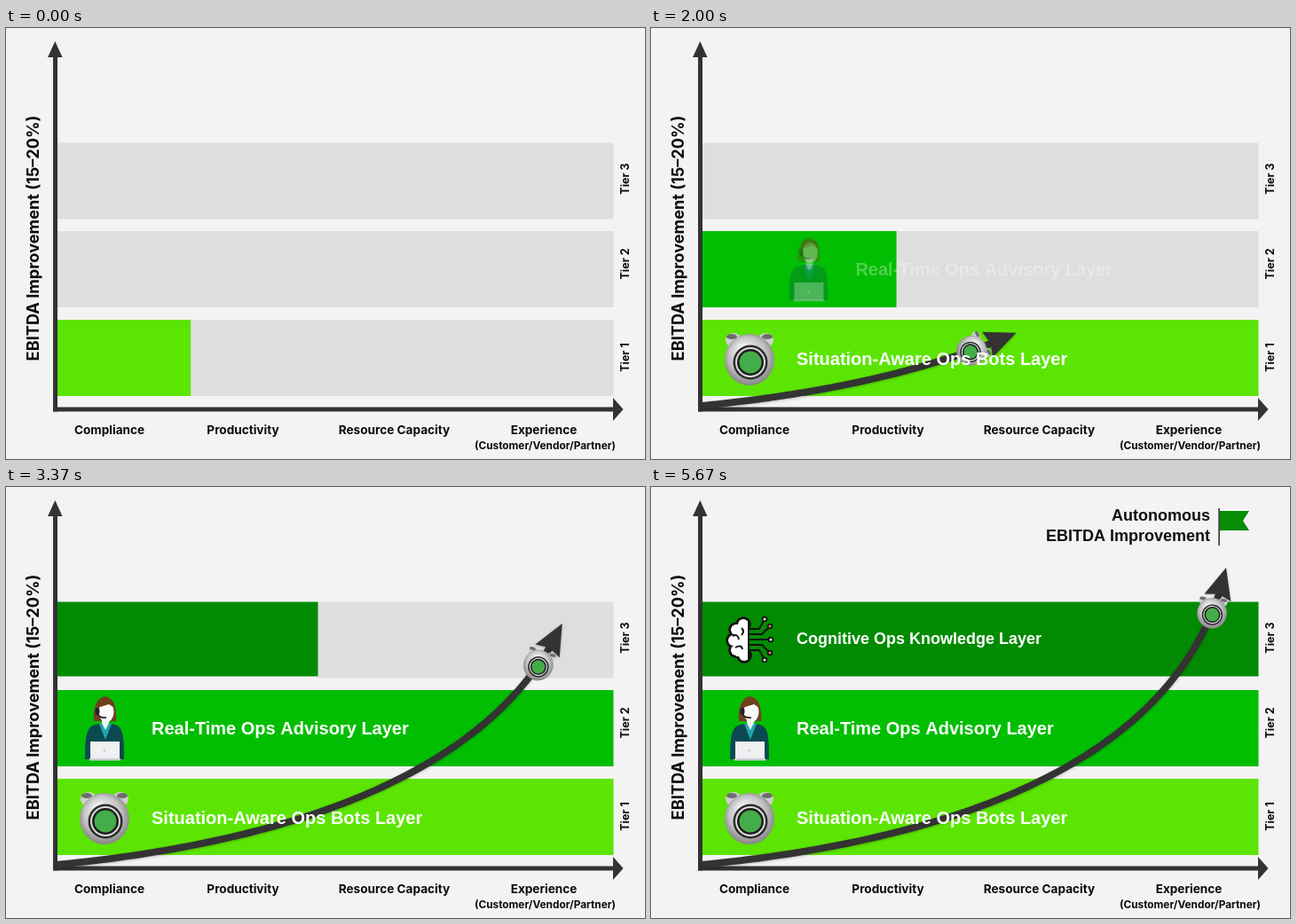
An HTML page with a canvas for the animation above (8000 ms loop, 720 by 486 pixels).

```html
<!DOCTYPE html>
<html lang="en">
<head>
<meta charset="utf-8">
<title>EBITDA improvement tiers</title>
<style>
html, body { margin: 0; width: 100%; height: 100%; overflow: hidden; background: #f3f3f3; }
canvas { display: block; }
</style>
</head>
<body>
<canvas id="stage" width="720" height="486"></canvas>
<script>
const ctx = document.getElementById('stage').getContext('2d');
const LOOP = 8000;
const DARK = '#333333';
const BACK = '#f3f3f3';
const LEFT = 57;
const RIGHT = 684.5;
const LABEL = 'Inter, "Open Sans", sans-serif';
const LAYER = '"Liberation Sans", Arial, sans-serif';

const clamp = v => Math.max(0, Math.min(1, v));
const span = (t, a, b) => clamp((t - a) / (b - a));
const easeOut = u => 1 - (1 - u) * (1 - u);

// Linear interpolation through [time, value] pairs
function keyed(t, keys) {
  let prev = keys[0];
  for (const key of keys) {
    if (t < key[0]) {
      return prev[1] + (key[1] - prev[1]) * (t - prev[0]) / (key[0] - prev[0]);
    }
    prev = key;
  }
  return prev[1];
}

function poly(points, fill) {
  ctx.beginPath();
  points.forEach(([x, y]) => ctx.lineTo(x, y));
  ctx.closePath();
  ctx.fillStyle = fill;
  ctx.fill();
}

function oval(x, y, rx, ry, fill, stroke, width = 1) {
  ctx.beginPath();
  ctx.ellipse(x, y, rx, ry, 0, 0, Math.PI * 2);
  if (fill) { ctx.fillStyle = fill; ctx.fill(); }
  if (stroke) { ctx.strokeStyle = stroke; ctx.lineWidth = width; ctx.stroke(); }
}

function rect(x, y, w, h, fill) {
  ctx.fillStyle = fill;
  ctx.fillRect(x, y, w, h);
}

function text(str, x, y, font, fill, align = 'left') {
  ctx.font = font;
  ctx.fillStyle = fill;
  ctx.textAlign = align;
  ctx.fillText(str, x, y);
}

function at(x, y, draw, { scale = 1, angle = 0, alpha = 1 } = {}) {
  ctx.save();
  ctx.translate(x, y);
  ctx.rotate(angle);
  ctx.scale(scale, scale);
  ctx.globalAlpha = alpha;
  draw();
  ctx.restore();
}

function label(str, x, y, size, angle = 0) {
  at(x, y, () => text(str, 0, 0, `700 ${size}px ${LABEL}`, '#0c0c0c', 'center'), { angle });
}

function bot() {
  for (const side of [-1, 1]) {
    oval(side * 18, -21, 9, 8, '#cfcfcf');
    oval(side * 20, -25, 6, 3, '#6c6c6c');
  }
  const shade = ctx.createRadialGradient(-7, -11, 4, 0, 0, 30);
  shade.addColorStop(0, '#f2f2f2');
  shade.addColorStop(0.65, '#c2c2c2');
  shade.addColorStop(1, '#858585');
  oval(0, 1, 28, 29, shade);
  oval(1, 4, 19.5, 19.5, '#2c2c2c');
  oval(1, 4, 17, 17, '#dcdcdc');
  oval(1, 4, 15, 15, '#1c1c1c');
  oval(1, 4, 12.5, 12.5, '#44ad49');
}

function advisor() {
  ctx.beginPath();
  ctx.moveTo(-12, -8);
  ctx.bezierCurveTo(-15, -44, 16, -46, 13, -8);
  ctx.closePath();
  ctx.fillStyle = '#70401f';
  ctx.fill();
  rect(-3, -12, 8, 12, '#e9e9e9');
  ctx.beginPath();
  ctx.moveTo(-22, 35);
  ctx.bezierCurveTo(-22, 2, -19, -3, -6, -5);
  ctx.lineTo(8, -5);
  ctx.bezierCurveTo(20, -3, 22, 3, 22, 35);
  ctx.closePath();
  ctx.fillStyle = '#0b4951';
  ctx.fill();
  poly([[-6, -5], [8, -5], [1, 13]], '#23a5ad');
  poly([[-3, -6], [5, -6], [1, 2]], '#f7f7f7');
  oval(2, -18.5, 8.5, 11.5, '#fbfbfb');
  poly([[-8, -23], [-6, -32], [4, -34], [10, -30], [11, -23], [5, -27]], '#70401f');
  oval(-8, -19, 2.5, 4, '#222');
  ctx.beginPath();
  ctx.moveTo(-8, -16);
  ctx.quadraticCurveTo(-5, -11, 2, -12);
  ctx.strokeStyle = '#222';
  ctx.lineWidth = 1.6;
  ctx.stroke();
  rect(-16, 15, 33, 20, '#eef0f2');
  rect(-17, 34, 35, 2.5, '#c9ced2');
  oval(0, 25, 1.5, 1.5, '#c9ced2');
}

function brain() {
  const lobes = [[-7, -17, 7], [-15, -11, 7], [-18, 1, 7], [-15, 12, 7], [-6, 18, 7]];
  lobes.forEach(([x, y, r]) => oval(x, y, r, r, '#fff', '#111', 3.5));
  lobes.forEach(([x, y, r]) => oval(x, y, r - 1, r - 1, '#fff'));
  rect(-15, -17, 14, 36, '#fff');
  ctx.strokeStyle = '#111';
  ctx.lineWidth = 2;
  ctx.beginPath();
  ctx.moveTo(-1, -22); ctx.lineTo(-1, 24);
  ctx.moveTo(-19, -4); ctx.quadraticCurveTo(-13, -7, -12, 0);
  ctx.moveTo(-16, 9); ctx.quadraticCurveTo(-9, 5, -8, 11);
  ctx.moveTo(-9, -13); ctx.quadraticCurveTo(-5, -9, -9, -5);
  for (const s of [-1, 1]) {
    ctx.moveTo(0, s * 12); ctx.lineTo(11, s * 12); ctx.lineTo(16, s * 21);
    ctx.moveTo(0, s * 6); ctx.lineTo(14, s * 6); ctx.lineTo(21, s * 13);
  }
  ctx.moveTo(0, 0); ctx.lineTo(22, 0);
  ctx.stroke();
  for (const s of [-1, 1]) {
    oval(17, s * 23, 2.4, 2.4, '#e8e8e8', '#111', 1.7);
    oval(23, s * 15, 2.4, 2.4, '#e37b70', '#111', 1.7);
  }
  oval(24, 0, 2.4, 2.4, '#e8e8e8', '#111', 1.7);
}

function flag() {
  rect(-0.7, -42, 1.6, 42, '#333');
  poly([[1, -39], [34, -39], [27, -28], [34, -17], [1, -17]], '#068c06');
}

// Growth curve
const PATH = [[57, 426], [300, 402], [595, 328], [648, 91]];
function point(t) {
  const u = 1 - t;
  const k = [u * u * u, 3 * u * u * t, 3 * u * t * t, t * t * t];
  return [0, 1].map(axis => PATH.reduce((sum, p, i) => sum + p[axis] * k[i], 0));
}

// Curve parameter a given distance behind the tip
function behind(t, dist) {
  const [x, y] = point(t);
  let s = t;
  while (s > -0.3) {
    const [px, py] = point(s);
    if (Math.hypot(x - px, y - py) >= dist) break;
    s -= 0.001;
  }
  return s;
}

const TIP = [[0, 0], [700, 0.176], [1470, 0.336], [2370, 0.583], [2970, 0.774], [3660, 1]];

function growth(t) {
  if (t < 30) return;
  const u = keyed(t, TIP);
  const [x, y] = point(u);
  const [bx, by] = point(behind(u, 36));
  const angle = Math.atan2(y - by, x - bx);

  ctx.save();
  ctx.beginPath();
  ctx.rect(56, 0, 664, 486);
  ctx.clip();

  ctx.save();
  ctx.shadowColor = 'rgba(0,0,0,.25)';
  ctx.shadowBlur = 3;
  ctx.shadowOffsetY = 1;
  const end = behind(u, 24);
  if (end > 0) {
    ctx.beginPath();
    for (let i = 0; i <= 80; i++) ctx.lineTo(...point(end * i / 80));
    ctx.strokeStyle = DARK;
    ctx.lineWidth = 7.8;
    ctx.stroke();
  }
  at(x, y, () => poly([[0, 0], [-35, -15.5], [-31, 0], [-35, 15.5]], DARK), { angle });
  ctx.restore();

  const [rx, ry] = point(behind(u, 53));
  const lean = Math.atan2(y - ry, x - rx) + Math.PI / 2;
  at(rx, ry, bot, { scale: 0.6, angle: lean - 0.2 });
  ctx.restore();
}

const TIERS = [
  { y: 329, h: 86, fill: '#5ce503', edge: [[0, 208], [700, 339], [1470, 570], [1850, RIGHT]],
    label: 'Situation-Aware Ops Bots Layer', size: 20, base: 380, start: 197 },
  { y: 229, h: 86, fill: '#02be02', edge: [[1740, LEFT], [2370, 587], [2485, RIGHT]],
    label: 'Real-Time Ops Advisory Layer', size: 20, base: 279, start: 1930, icon: advisor, iconY: 272 },
  { y: 129.5, h: 86, fillH: 84, fill: '#028b02', edge: [[3080, LEFT], [3700, RIGHT]],
    label: 'Cognitive Ops Knowledge Layer', size: 18, base: 177, start: 3520, icon: brain, iconY: 172 }
];

function bars(t) {
  for (const { y, h, fillH = h, fill, edge } of TIERS) {
    const width = keyed(t, edge) - LEFT;
    const shown = t < edge[0][0] ? 0 : width;
    rect(LEFT + shown, y, RIGHT - LEFT - shown, h, '#dedede');
    rect(LEFT, y, shown, fillH, fill);
  }
}

function layers(t) {
  at(111, 373, bot, { alpha: span(t, 100, 450) });
  for (const tier of TIERS) {
    const u = span(t, tier.start, tier.start + 800);
    if (!u) continue;
    const shift = 80 * (1 - easeOut(u));
    const alpha = clamp(u * 3.4);
    if (tier.icon) at(111 + shift, tier.iconY, tier.icon, { alpha });
    at(164 + shift, tier.base, () => text(tier.label, 0, 0, `bold ${tier.size}px ${LAYER}`, '#fff'), { alpha });
  }
}

function axes() {
  rect(53, 30, 5, 402.5, DARK);
  rect(53, 427.5, 633, 5, DARK);
  poly([[55.3, 15], [63.5, 33], [47, 33]], DARK);
  poly([[695.5, 430], [684, 443], [684, 417]], DARK);

  label('Compliance', 116.5, 458, 13.6);
  label('Productivity', 267, 458, 13.6);
  label('Resource Capacity', 437.5, 458, 13.6);
  label('Experience', 606, 458, 13.6);
  label('(Customer/Vendor/Partner)', 607.5, 475, 11.8);
  const up = -Math.PI / 2;
  label('EBITDA Improvement (15–20%)', 36.5, 237, 18.2, up);
  label('Tier 1', 701.5, 371.5, 12.5, up);
  label('Tier 2', 701.5, 266, 12.5, up);
  label('Tier 3', 701.5, 170, 12.5, up);
}

function goal(t) {
  const u = span(t, 3690, 4150);
  if (u) {
    const scale = 0.6 + 0.4 * easeOut(u);
    at(640 - 18 * (1 - scale), 66 + 96 * (1 - scale), flag, { scale, alpha: clamp(u * 1.8) });
  }
  const v = span(t, 4250, 4900);
  if (v) {
    at(630 + 12 * (1 - easeOut(v)), 0, () => {
      const font = `bold 18px ${LAYER}`;
      text('Autonomous', 0, 38, font, '#111', 'right');
      text('EBITDA Improvement', 0, 61, font, '#111', 'right');
    }, { alpha: v });
  }
}

const began = performance.now();
function frame() {
  const t = (performance.now() - began) % LOOP;
  rect(0, 0, 720, 486, BACK);
  bars(t);
  axes();
  growth(t);
  layers(t);
  goal(t);
  requestAnimationFrame(frame);
}
frame();
</script>
</body>
</html>
```
